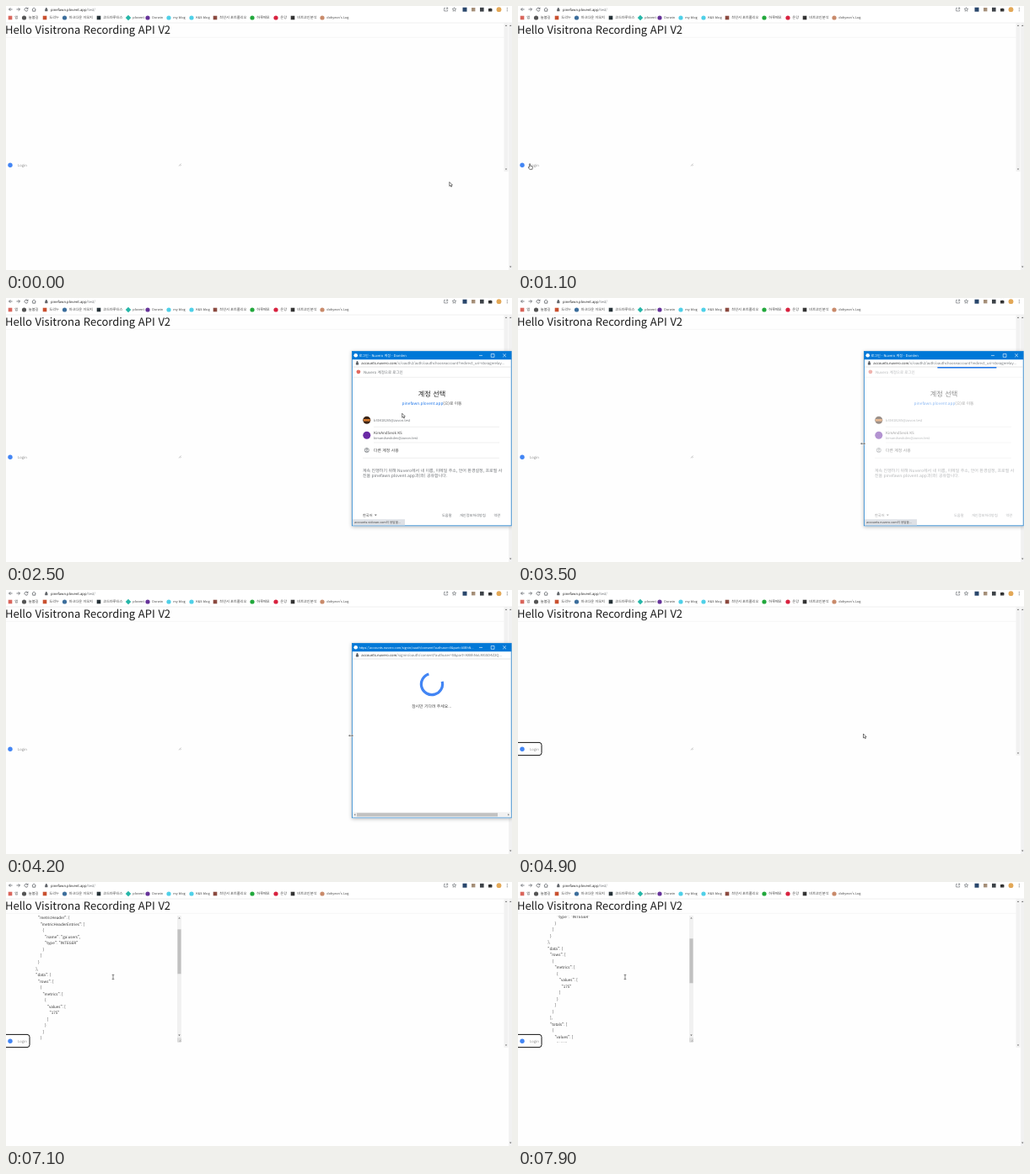
Recreate the animation shown at these times as an HTML page. Size 600 px wide and 314 px high, loop 8 s.

```html
<!DOCTYPE html>
<html lang="ko">
<head>
<meta charset="utf-8">
<title>API login demo</title>
<style>
  html, body { margin: 0; width: 100%; height: 100%; overflow: hidden; background: #fefefe; }
  svg { display: block; width: 600px; height: 314px; }
  text {
    font-family: "Noto Sans CJK KR", "Noto Sans CJK JP", "Noto Sans", sans-serif;
    font-size: 4.2px; fill: #444; text-rendering: geometricPrecision; white-space: pre;
  }
  .icon { fill: none; stroke: #5f6368; stroke-width: .8; }
  .rule { fill: none; stroke: #e4e4e4; stroke-width: .6; }
  .track { fill: #f1f1f1; }
  .thumb { fill: #c1c1c1; }
  .arrow { fill: #6b6b6b; }
  .host { fill: #222; }
  .dim { fill: #6d7175; }
  .white { fill: #fff; }
  .mid { text-anchor: middle; }
  .link { fill: #1a73e8; font-weight: 500; }
  .cur { fill: #fff; stroke: #222; stroke-width: .6; stroke-linejoin: round; }
</style>
</head>
<body>
<svg viewBox="0 0 600 314">
  <defs>
    <clipPath id="box"><rect x="0" y="40" width="203" height="150.5"/></clipPath>
    <clipPath id="win"><rect x="411" y="64" width="187.5" height="206.5"/></clipPath>
    <filter id="shade" x="-10%" y="-10%" width="120%" height="120%">
      <feDropShadow dx="0" dy="1" stdDeviation="2" flood-opacity=".3"/>
    </filter>
  </defs>

  <!-- browser bar -->
  <rect class="white" width="600" height="20"/>
  <g class="icon">
    <path d="M7.5 4H3.5M5.3 2.2L3.5 4L5.3 5.8M12.5 4H16.5M14.7 2.2L16.5 4L14.7 5.8"/>
    <path d="M25.6 2.8A2 2 0 1 0 26 4.7M26 1.8V3.4H24.3"/>
    <path d="M31 4.2L33.2 2L35.4 4.2M31.7 3.8V6.2H34.7V3.8"/>
    <path d="M521 2.4H519.6V6H523.6V4.6M521.5 4.2L523.6 2.2M522 2.1H523.7V3.8" stroke-width=".6"/>
    <path id="star" stroke-width=".6"/>
  </g>
  <path d="M46.2 3.7H49.4V6.3H46.2ZM46.8 3.7V2.9A1 1 0 0 1 48.8 2.9V3.7" fill="#5f6368"/>
  <text x="53" y="5.8" font-size="4.15" class="dim" style="font-size:4.15px"><tspan class="host">pinefawn.plovent.app</tspan>/test/</text>
  <rect x="541.5" y="1.7" width="5" height="5" fill="#29466b"/>
  <rect x="552" y="2" width="4.4" height="4.4" fill="#a58f78"/>
  <rect x="562" y="1.8" width="4.6" height="4.8" fill="#3d4247"/>
  <path d="M572 3H573.4A.9.9 0 0 1 575 3H576.3V4.3A.8.8 0 0 1 576.3 5.6V6.6H572Z" fill="#333"/>
  <circle cx="584.5" cy="4.2" r="2.9" fill="#e3a857"/>
  <path d="M594.3 2.1v.8M594.3 3.8v.8M594.3 5.5v.8" stroke="#444" stroke-width=".8"/>
  <g id="marks"></g>
  <path class="rule" d="M0 20H600"/>

  <!-- page -->
  <rect class="track" x="590.5" y="20.3" width="5" height="176.5"/>
  <rect class="track" x="596.2" y="20.3" width="3.8" height="293.7"/>
  <path class="arrow" d="M591.8 24L593 22.4L594.2 24ZM591.8 193.4L593 195L594.2 193.4Z"/>
  <path class="arrow" d="M597 24L598.2 22.4L599.4 24ZM597 309.6L598.2 311.2L599.4 309.6Z"/>
  <path class="rule" d="M0 37.3H590.5" style="stroke:#eee"/>
  <text x="-1" y="33" style="font-size:13px;fill:#1c1c1c">Hello Visitrona Recording API V2</text>
  <g id="report">
    <g clip-path="url(#box)"><g id="lines"></g></g>
    <rect class="track" x="203" y="40" width="5" height="145.5"/>
    <rect id="thumb" class="thumb" x="203.4" y="45.3" width="4.2" height="53"/>
    <path class="arrow" d="M204.3 43.6L205.5 42L206.7 43.6ZM204.3 181.6L205.5 183.2L206.7 181.6Z"/>
    <rect x="203" y="185.3" width="5" height="5.2" fill="#dcdcdc"/>
  </g>
  <path d="M205 190.3L207.6 187.6M206.5 190.3L207.6 189.2" stroke="#888" stroke-width=".5"/>
  <rect id="focus" x="-4" y="181.4" width="32" height="15.2" rx="3" fill="#fff" stroke="#111"/>
  <circle cx="5" cy="189.2" r="2.7" fill="#4285f4"/>
  <text x="14" y="190.8" style="fill:#8a8a8a">Login</text>

  <!-- sign-in window -->
  <g id="popup">
    <rect x="410.4" y="63.4" width="188.8" height="207.4" fill="#fff" stroke="#2b88d0" stroke-width=".8" filter="url(#shade)"/>
    <rect x="410.4" y="63.4" width="188.8" height="9.8" fill="#0078d7"/>
    <circle cx="414.7" cy="68.3" r="2.3" class="white"/>
    <path d="M561 68.4H565M575.2 66.5H579V70.3H575.2ZM589.2 66.4L593 70.2M593 66.4L589.2 70.2" fill="none" stroke="#fff" stroke-width=".6"/>
    <path d="M414.9 76.9H418.1V79.4H414.9ZM415.5 76.9V76.1A1 1 0 0 1 417.5 76.1V76.9" fill="#5f6368"/>
    <path class="rule" d="M411 82H598.6" style="stroke:#d4d4d4"/>
    <text id="title" class="white" x="418.4" y="69.8"></text>
    <text class="dim" x="421.3" y="79"><tspan class="host">accounts.nuvero.com</tspan><tspan id="path"></tspan></text>

    <g id="chooser">
      <circle cx="417.9" cy="87.8" r="2.4" fill="#e26a5f"/>
      <text class="dim" x="424" y="89.5" style="font-size:4.5px">Nuvero 계정으로 로그인</text>
      <path class="rule" d="M411 94.3H598.6M436 153.3H585M436 172H585M423 190.3H585"/>
      <text class="mid" x="505" y="117" style="font-size:8.2px;fill:#222">계정 선택</text>
      <text class="mid" x="505" y="127" style="font-size:4.75px"><tspan class="link">pinefawn.plovent.app</tspan>(으)로 이동</text>
      <circle cx="427.8" cy="145.2" r="4.5" fill="#3a2416"/>
      <rect x="423.9" y="144" width="7.8" height="2.6" fill="#d2772c"/>
      <text class="dim" x="436" y="146.9" style="font-size:4px">b30418265@zuvon.test</text>
      <circle cx="427.8" cy="163.2" r="4.5" fill="#6a2aa5"/>
      <text x="436" y="161.7" style="font-size:4.5px;font-weight:500">KimAndSeok KS</text>
      <text class="dim" x="436" y="167.9" style="font-size:3.95px">kimandseokdev@zuvon.test</text>
      <g class="icon" style="stroke-width:.6">
        <circle cx="427.8" cy="181" r="2.6"/><circle cx="427.8" cy="180.2" r=".9"/>
        <path d="M426 182.8Q427.8 181.3 429.6 182.8"/>
      </g>
      <text x="436" y="182.7" style="font-size:4.9px">다른 계정 사용</text>
      <g class="dim" style="font-size:5px">
        <text class="dim" x="423" y="207" style="font-size:5px">계속 진행하기 위해 Nuvero에서 내 이름, 이메일 주소, 언어 환경설정, 프로필 사</text>
        <text class="dim" x="423" y="213.3" style="font-size:5px">진을 pinefawn.plovent.app과(와) 공유합니다.</text>
      </g>
      <text x="423" y="259.9">한국어</text>
      <path class="arrow" d="M436.8 257.5H439.8L438.3 259.3Z"/>
      <text class="dim" x="517" y="259.9">도움말</text>
      <text class="dim" x="538" y="259.9">개인정보처리방침</text>
      <text class="dim" x="578.5" y="259.9">약관</text>
    </g>
    <g id="status">
      <rect x="411" y="263.2" width="62" height="7.2" fill="#dee1e6"/>
      <text id="wait" x="413" y="268.3" style="font-size:3.65px"></text>
    </g>
    <g clip-path="url(#win)"><rect id="bar" y="82" width="70" height="1.5" fill="#1a73e8"/></g>

    <g id="consent">
      <path id="ring" fill="none" stroke="#4285f4" stroke-width="3.2"/>
      <text class="mid" x="504.8" y="140" style="font-size:4.9px">잠시만 기다려 주세요...</text>
      <rect class="track" x="411" y="264.3" width="187.6" height="6"/>
      <rect class="thumb" x="416" y="265.2" width="167" height="4.2"/>
      <path class="arrow" d="M414.3 266L412.8 267.3L414.3 268.6ZM595.3 266L596.8 267.3L595.3 268.6Z"/>
    </g>
  </g>

  <g id="cursor">
    <path id="pointer" class="cur" d="M0 0V5L1.2 4L2 5.8L2.9 5.4L2.1 3.7H3.6Z"/>
    <path id="hand" class="cur" d="M-.6 .5A.6.6 0 0 1 .6 .5V2.5L3 3.1Q3.5 3.3 3.4 4L2.9 6.6H-.2L-2 4.2Q-1.6 3.4 -.6 4.2Z"/>
    <path id="resize" d="M-3.6 2.2L-1.8 .8V1.7H.8V.8L2.6 2.2L.8 3.6V2.7H-1.8V3.6Z" fill="#555" stroke="#fff" stroke-width=".3"/>
    <path id="beam" d="M-1.3 -2.6H1.3M0 -2.6V2.6M-1.3 2.6H1.3" fill="none" stroke="#333" stroke-width=".6"/>
  </g>
</svg>

<script>
const LOOP = 8000;
const $ = id => document.getElementById(id);
const show = (id, on) => { $(id).style.display = on ? "" : "none"; };

function add(parent, tag, attrs, label) {
  const node = document.createElementNS("http://www.w3.org/2000/svg", tag);
  for (const key in attrs) node.setAttribute(key, attrs[key]);
  if (label) node.textContent = label;
  parent.append(node);
}

// Bookmarks: icon x, colour, shape, label
const marks = [
  [5, "#d9655b", "s", "앱"], [21.5, "#555", "c", "늘봄길"], [46, "#c9502f", "s", "도리누"],
  [69.5, "#3c6e9c", "c", "마크다운 이모지"], [110, "#263238", "s", "코드마루터스"],
  [145, "#25b5a7", "d", "plovent"], [168, "#663399", "c", "Dorwin"],
  [193, "#4fd0e8", "c", "my blog"], [220, "#4fd0e8", "c", "K&S blog"],
  [248, "#8b4a3f", "s", "최민서 포트폴리오"], [292, "#22a83c", "c", "하루메모"],
  [320, "#d8223f", "c", "온강"], [340, "#333", "s", "비트코인분석"],
  [375, "#c98a6a", "c", "dohyeon's Log"]
];
for (const [x, fill, shape, label] of marks) {
  if (shape === "c") add($("marks"), "circle", { cx: x, cy: 14, r: 2.6, fill });
  else add($("marks"), "rect", {
    x: x - 2.3, y: 11.7, width: 4.6, height: 4.6, fill,
    transform: shape === "d" ? `rotate(45 ${x} 14) ` : ""
  });
  const size = /[a-z]/.test(label) ? 3.8 : 4.2;
  add($("marks"), "text", { x: x + 5.3, y: 15.4, style: `font-size:${size}px` }, label);
}

$("star").setAttribute("d", "M" + Array.from({ length: 10 }, (_, i) => {
  const r = i % 2 ? 1.1 : 2.5, a = i * Math.PI / 5;
  return `${531.5 + r * Math.sin(a)} ${4.2 - r * Math.cos(a)}`;
}).join("L") + "Z");

const report = {
  reports: [{
    columnHeader: { metricHeader: { metricHeaderEntries: [{ name: "ga:users", type: "INTEGER" }] } },
    data: { rows: [{ metrics: [{ values: ["175"] }] }], totals: [{ values: ["175"] }] }
  }]
};
JSON.stringify(report, null, 1).split("\n").forEach((line, i) => {
  const text = line.trimStart(), depth = line.length - text.length;
  add($("lines"), "text", {
    x: 27.2 + depth * 2.7, y: 45.6 + i * 7.526, style: "font-size:4.55px;fill:#333"
  }, text);
});

const ease = p => p * p * (3 - 2 * p);
const ramp = (t, from, span) => ease(Math.min(1, Math.max(0, (t - from) / span)));

// Pointer stops: time, x, y
const stops = [
  [0, 525.8, 209.3], [100, 525.8, 209.3], [850, 14, 187.7], [1500, 14, 187.7],
  [1850, 307, 168], [2300, 469.7, 137.2], [2600, 469.7, 137.2], [2900, 452, 161],
  [3150, 452, 161], [3450, 409.5, 171], [6350, 409.5, 171], [6850, 127, 113], [LOOP, 127, 113]
];
const shapes = [
  [0, "pointer"], [780, "hand"], [1530, "pointer"], [2750, "hand"],
  [3250, "pointer"], [3400, "resize"], [4800, "pointer"], [6700, "beam"]
];

function place(t) {
  const i = stops.findIndex(s => s[0] > t);
  const [t0, x0, y0] = stops[i - 1], [t1, x1, y1] = stops[i];
  const p = ease((t - t0) / (t1 - t0));
  $("cursor").setAttribute("transform", `translate(${x0 + (x1 - x0) * p} ${y0 + (y1 - y0) * p})`);
  const shape = shapes.filter(s => s[0] <= t).pop()[1];
  for (const id of ["pointer", "hand", "resize", "beam"]) show(id, id === shape);
}

function spin(t) {
  const at = deg => {
    const a = deg * Math.PI / 180;
    return `${505 + 12.6 * Math.cos(a)} ${112 + 12.6 * Math.sin(a)}`;
  };
  const start = -15 + (t - 4200) * .257;
  $("ring").setAttribute("d", `M${at(start)}A12.6 12.6 0 1 1 ${at(start + 268)}`);
}

function draw(t) {
  const consent = t >= 3900, busy = t >= 3150 && !consent;
  show("popup", t >= 1500 && t < 4800);
  show("chooser", t >= 1800 && !consent);
  show("status", t >= 1800 && !consent);
  show("bar", busy);
  show("consent", consent);
  $("chooser").style.opacity = busy ? .5 : 1;
  $("title").textContent = consent
    ? "https://accounts.nuvero.com/signin/oauth/consent?authuser=0&part=AXBhN..."
    : "로그인 - Nuvero 계정 - Domlen";
  $("title").style.fontSize = consent ? "3.7px" : "4.1px";
  $("path").textContent = consent
    ? "/signin/oauth/consent?authuser=0&part=AXBhNoLMGSD4Z2Q..."
    : "/o/oauth2/auth/oauthchooseaccount?redirect_uri=storagerelay...";
  $("wait").textContent = `accounts.${busy ? "nuvero" : "vidoran"}.com의 응답을...`;
  $("bar").setAttribute("x", 411 + Math.max(0, t - 3200) % 700 * .287);
  spin(t);

  show("focus", t >= 4800);
  show("report", t >= 5500);
  const notches = ramp(t, 6950, 150) + ramp(t, 7450, 150);
  $("lines").setAttribute("transform", `translate(0 ${-31.4 * notches})`);
  $("thumb").setAttribute("y", 45.3 + 11 * notches);
  place(t);
}

const begin = performance.now();
function tick() {
  draw((performance.now() - begin) % LOOP);
  requestAnimationFrame(tick);
}
tick();
</script>
</body>
</html>
```
